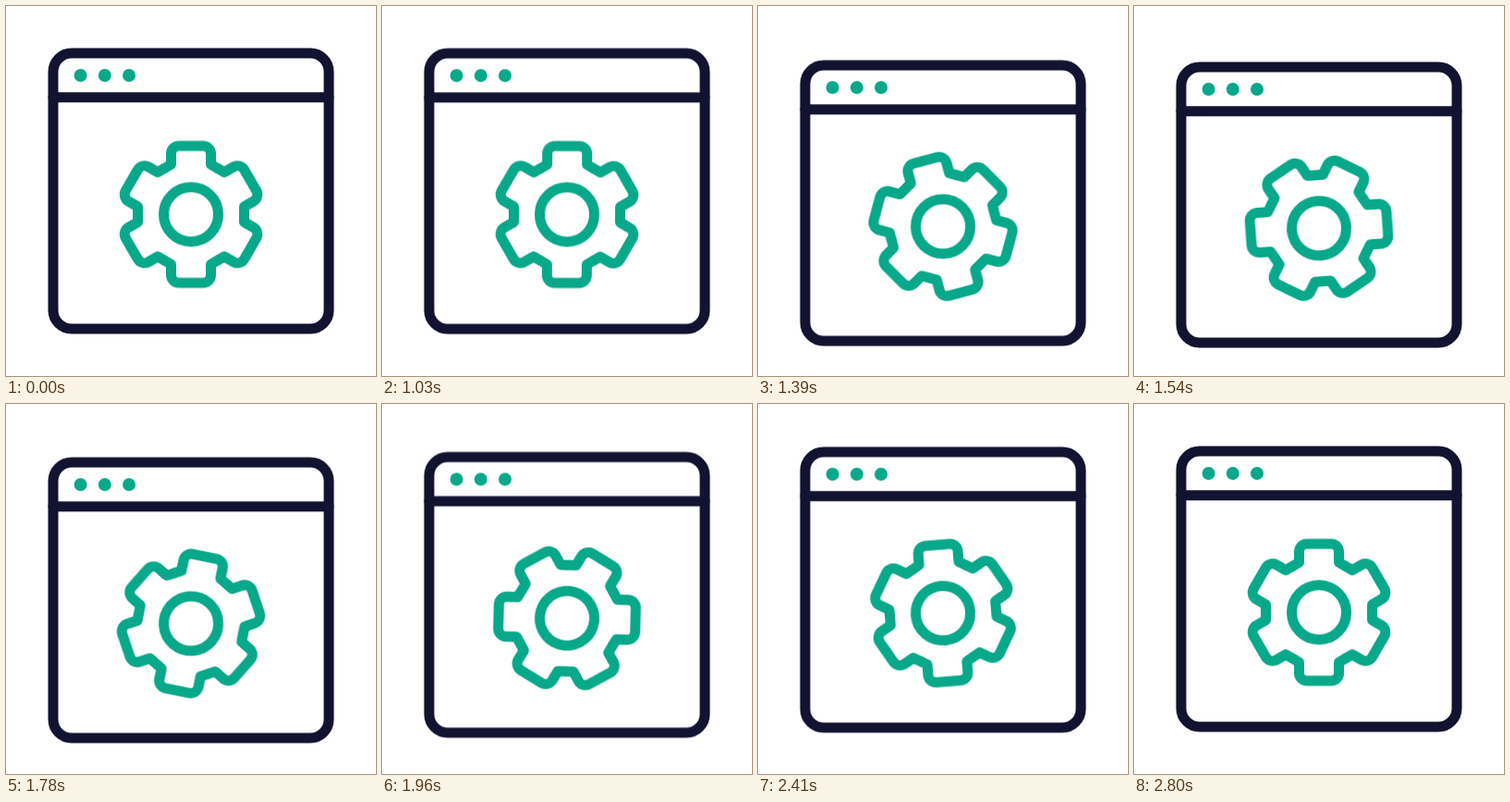
These frames come from a looping animation (400x400 px, 2830 ms). An HTML page without scripts:

```html
<!DOCTYPE html>
<html lang="en">
<head>
<meta charset="utf-8">
<title>Settings window</title>
<style>
  html, body { margin: 0; width: 100%; height: 100%; overflow: hidden; background: #fff; }
  svg { display: block; width: 100%; height: 100%; }
  .line { fill: none; stroke-width: 11; stroke-linecap: round; stroke-linejoin: round; }
  .navy { stroke: #121331; }
  .green { stroke: #08a88a; }
  .dots { fill: #08a88a; }
  .window { animation: dip 2830ms linear infinite; }
  .gear { animation: turn 2830ms linear infinite; }

  /* rest for 1000 ms, lowest at 1540 ms, settled at 2800 ms */
  @keyframes dip {
    0% { transform: translateY(0); }
    35.336% { transform: translateY(0); animation-timing-function: cubic-bezier(.333, 0, .54, 1); }
    54.417% { transform: translateY(15px); animation-timing-function: cubic-bezier(.333, 0, .135, 1); }
    98.94%, 100% { transform: translateY(0); }
  }
  @keyframes turn {
    0% { transform: rotate(0deg); }
    35.336% { transform: rotate(0deg); animation-timing-function: cubic-bezier(.333, 0, .16, 1); }
    98.94%, 100% { transform: rotate(180deg); }
  }
</style>
</head>
<body>
<svg viewBox="0 0 400 400">
  <defs>
    <path id="tooth" d="M-28.75 -49.8L-21.5 -54V-65.5a8.5 8.5 0 0 1 8.5 -8.5H13a8.5 8.5 0 0 1 8.5 8.5V-54L28.75 -49.8"/>
  </defs>
  <g class="window">
    <g class="line navy">
      <rect x="51" y="51" width="298" height="298" rx="20"/>
      <path d="M51 98.7H349"/>
    </g>
    <g class="dots">
      <circle cx="80.6" cy="75" r="7"/>
      <circle cx="106.8" cy="75" r="7"/>
      <circle cx="133" cy="75" r="7"/>
    </g>
    <g transform="translate(200 225.3)">
      <g class="gear line green">
        <circle r="29.5"/>
        <use href="#tooth"/>
        <use href="#tooth" transform="rotate(60)"/>
        <use href="#tooth" transform="rotate(120)"/>
        <use href="#tooth" transform="rotate(180)"/>
        <use href="#tooth" transform="rotate(240)"/>
        <use href="#tooth" transform="rotate(300)"/>
      </g>
    </g>
  </g>
</svg>
</body>
</html>
```
